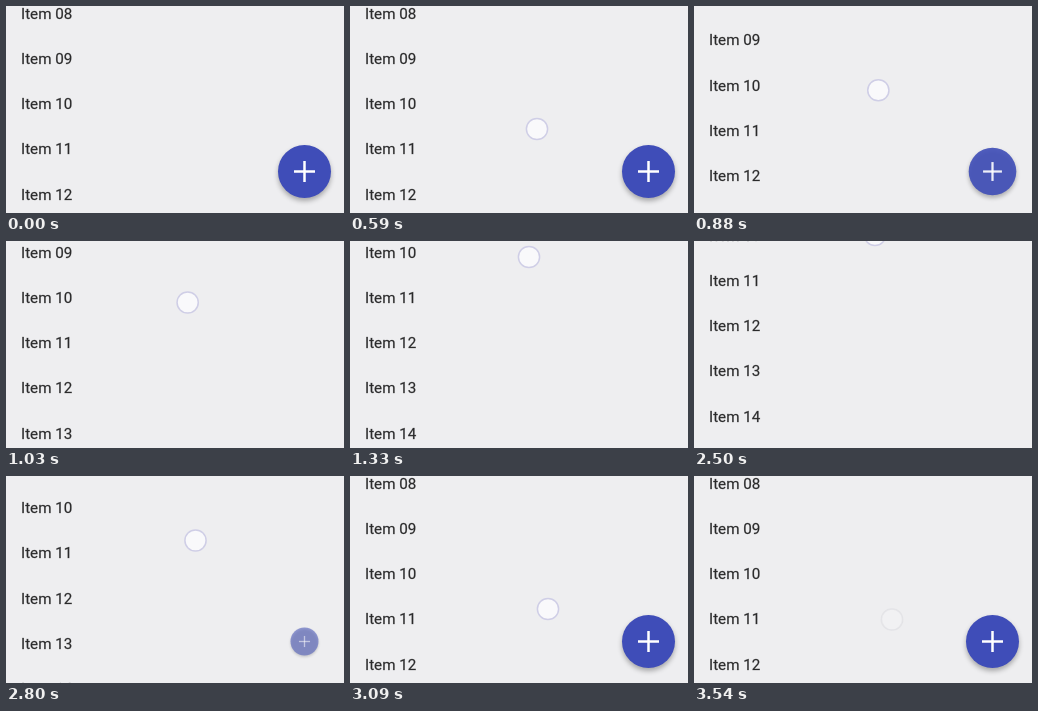
An HTML page with a canvas for the animation above (5610 ms loop, 338x207 px).

```html
<!DOCTYPE html>
<html lang="en">
<head>
<meta charset="utf-8">
<title>List with floating button</title>
<style>
  html, body { margin: 0; width: 100%; height: 100%; overflow: hidden; background: #eeeef0; }
  canvas { display: block; }
</style>
</head>
<body>
<canvas id="stage" width="338" height="207"></canvas>
<script>
const ctx = document.getElementById('stage').getContext('2d');
const W = 338, H = 207, LOOP = 5610;
const STEP = 147.3, LEAD = 8; // the picture advances in held steps
const PITCH = 45.25, FIRST = 8;

const ramp = (k, from, to) => Math.min(1, Math.max(0, (k - from) / (to - from)));
const easeOut = (u, power) => 1 - (1 - u) ** power;

// Drag up, slowing to a stop, then drag back down; the list follows the finger.
const scrollAt = k =>
  18.5 * ramp(k, 5, 6) + 68 * ramp(k, 6, 9) + 17 * easeOut(ramp(k, 9, 12), 3)
  - 37.5 * ramp(k, 18, 19) - 66 * ramp(k, 19, 21);

// The button shrinks away on the first drag and grows back on the second.
const buttonAt = k => k < 13 ? 1 - ramp(k, 5, 7) ** 3.3 : ramp(k, 18, 20) ** 0.92;

function touchAt(k) {
  if (k >= 4 && k < 13) {
    return {
      x: 187 - 8 * ramp(k, 5, 8),
      y: 123 - 16 * ramp(k, 4, 5) - 91 * ramp(k, 5, 9) - 14.5 * easeOut(ramp(k, 9, 12), 2),
      opacity: 1
    };
  }
  if (k >= 17) {
    return {
      x: 181 + 17 * ramp(k, 17, 21),
      y: -6 + 15 * ramp(k, 17, 18) + 55.5 * ramp(k, 18, 19)
        + 68.5 * ramp(k, 19, 21) + 10.5 * ramp(k, 21, 22),
      opacity: 1 - 0.7 * ramp(k, 22, 24)
    };
  }
  return null;
}

function disc(x, y, r, fill) {
  ctx.beginPath();
  ctx.arc(x, y, r, 0, Math.PI * 2);
  ctx.fillStyle = fill;
  ctx.fill();
}

function drawList(scroll) {
  ctx.font = '15.2px Roboto, sans-serif';
  ctx.fillStyle = '#2b2b2c';
  ctx.strokeStyle = 'rgba(43, 43, 44, 0.5)';
  ctx.lineWidth = 0.4;
  for (let n = FIRST; n < FIRST + 8; n++) {
    const label = 'Item ' + String(n).padStart(2, '0');
    const y = 12.6 + (n - FIRST) * PITCH - scroll;
    ctx.fillText(label, 15, y);
    ctx.strokeText(label, 15, y);
  }
}

function drawButton(scale) {
  if (!scale) return;
  ctx.save();
  ctx.translate(298.5, 165.5);
  ctx.scale(scale, scale);
  ctx.globalAlpha = scale;
  ctx.shadowColor = 'rgba(0, 0, 0, 0.3)';
  ctx.shadowBlur = 5 * scale;
  ctx.shadowOffsetY = 3 * scale;
  disc(0, 0, 26.5, '#3f4db8');
  ctx.shadowColor = 'transparent';
  ctx.fillStyle = '#fff';
  ctx.fillRect(-10.5, -1.25, 21, 2.5);
  ctx.fillRect(-1.25, -10.5, 2.5, 21);
  ctx.restore();
}

function drawTouch({ x, y, opacity }) {
  ctx.save();
  ctx.globalAlpha = opacity;
  disc(x, y, 10.6, '#f9f9fb');
  ctx.strokeStyle = opacity < 1 ? '#cbcbd2' : '#cfcee6';
  ctx.lineWidth = 1.5;
  ctx.stroke();
  ctx.restore();
}

function render(now) {
  const k = Math.floor((now % LOOP + LEAD) / STEP);
  const touch = touchAt(k);
  ctx.fillStyle = '#eeeef0';
  ctx.fillRect(0, 0, W, H);
  drawList(scrollAt(k));
  drawButton(buttonAt(k));
  if (touch) drawTouch(touch);
}

const start = performance.now();
function tick() {
  render(performance.now() - start);
  requestAnimationFrame(tick);
}
tick();
</script>
</body>
</html>
```
